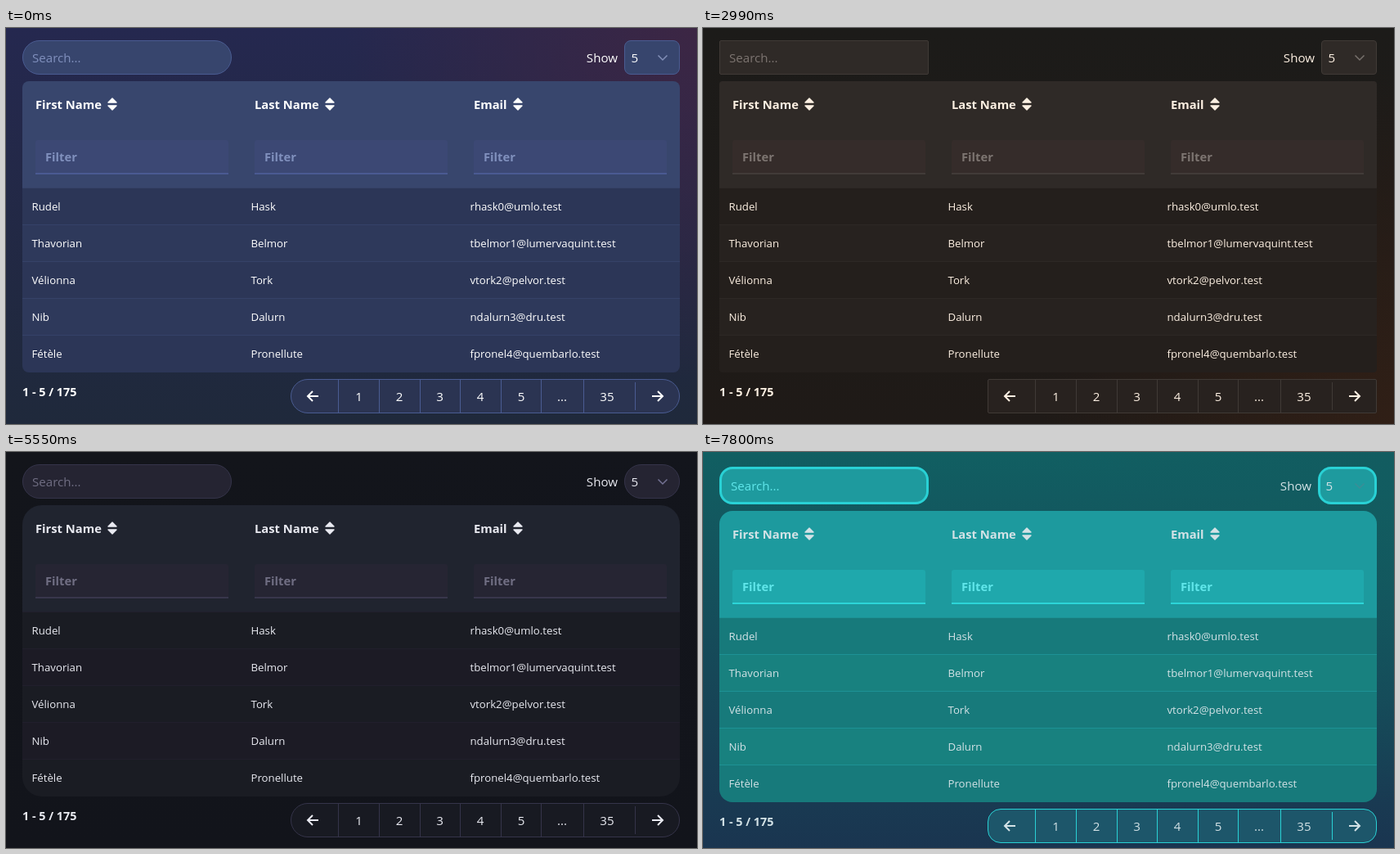
Animation, 845 px wide and 484 px high, one loop 8 s. Source, as an HTML page:

```html
<!DOCTYPE html>
<html lang="en">
<head>
<meta charset="utf-8">
<title>Table themes</title>
<style>
  html, body { margin: 0; width: 100%; height: 100%; overflow: hidden; background: #20263c; }
  svg { display: block; width: 845px; height: 484px; }
  text { white-space: pre; }
</style>
</head>
<body>
<svg id="stage" viewBox="0 0 845 484"></svg>
<script>
const LOOP = 8000, STEP = 70;
const stage = document.getElementById('stage');

const people = [
  ['Rudel', 'Hask', 'rhask0@umlo.test'],
  ['Thavorian', 'Belmor', 'tbelmor1@lumervaquint.test'],
  ['Vélionna', 'Tork', 'vtork2@pelvor.test'],
  ['Nib', 'Dalurn', 'ndalurn3@dru.test'],
  ['Fétèle', 'Pronellute', 'fpronel4@quembarlo.test'],
];
const columns = [['First Name', 88], ['Last Name', 86], ['Email', 48]];
const pages = [['1', 83.5], ['2', 133], ['3', 182.5], ['4', 232], ['5', 282], ['...', 332], ['35', 387]];
const dividers = [58.5, 108.5, 158.5, 207.5, 257.5, 306.5, 358.5];

// ---- themes ----
const colorKeys = 'sky ground glow head field line fill under row alt rule pager text hint mark'.split(' ');
const base = {
  glowX: 845, glowY: 0, weave: 0, inset: 0, border: 1, top: 15,
  searchR: 21, tableR: 24, selectR: 21, pagerR: 21,
  font: 'Open Sans', scale: .945, pageWeight: 400,
};
function theme(colors, shape) {
  const list = colors.split(' ');
  return { ...base, ...Object.fromEntries(colorKeys.map((key, i) => [key, '#' + list[i]])), ...shape };
}

const navy = theme('25284f 1f293b 3c2644 38466d 37456d 4a5c92 3c4874 4a5a92 2c3657 2e395b 354268 2b3452 ffffff 8090bd 8290b8',
  { tableR: 8, selectR: 8 });
const violet = theme('393a70 393568 3b366d 5352ae 4643a0 6561d2 5957b4 6c69d8 454389 484690 52509f 403e80 d8eadc a3a3dc 8580c0',
  { inset: 54, border: 3, top: 17, tableR: 28, font: 'Lato', scale: 1.03, pageWeight: 700 });
const ember = theme('1c1b19 1f1a17 301f16 2f2a27 2f2a27 403a36 352c2a 413b38 241f1c 27221f 2d2825 28221f fdf0e2 7d7571 78716d',
  { glowY: 484, searchR: 2, tableR: 4, selectR: 4, pagerR: 2 });
const slate = theme('2b3447 2b3447 2b3447 4a5979 4a5979 6076a9 4f5f83 667bb0 3c4660 3f4a65 4a5878 374159 ffffff 8c9dca 7d719f',
  { weave: 1, border: 2, top: 16, searchR: 2, tableR: 2, selectR: 2, pagerR: 0 });
const night = theme('13151b 12141b 13151c 20242f 252432 35344a 262533 38364c 1a1c23 1c1b25 211f2c 181a22 e9eaf1 706e83 747294');
const rose = theme('6b2c2e 561f2c 692a2d a33b4b a33b4b dc5169 b04051 dd5169 802f3b 862f3c 9a394a 742a37 ffeedd dc8090 8f70ae');
const teal = theme('115f62 1a3550 125c60 1d9a9e 1e9a9e 29d1d5 1fa8ac 2cd5d8 177a7b 18817f 1d9295 1d566a d3e2e6 60e6ea 3c8d96',
  { border: 3, top: 18, searchR: 16, tableR: 16, selectR: 16, pagerR: 16 });

const lerp = (a, b, p) => a + (b - a) * p;
function mixColor(a, b, p) {
  const part = (hex, i) => parseInt(hex.slice(1 + 2 * i, 3 + 2 * i), 16);
  return '#' + [0, 1, 2].map(i =>
    Math.round(lerp(part(a, i), part(b, i), p)).toString(16).padStart(2, '0')).join('');
}
function mix(a, b, p) {
  const out = {};
  for (const key in a) {
    if (typeof a[key] === 'number') out[key] = lerp(a[key], b[key], p);
    else if (a[key][0] === '#') out[key] = mixColor(a[key], b[key], p);
    else out[key] = p < .5 ? a[key] : b[key];
  }
  return out;
}

const round = { searchR: 21, tableR: 16, selectR: 16, pagerR: 21 };
const square = { searchR: 0, tableR: 0, selectR: 0, pagerR: 0 };
const indigo = { ...mix(navy, violet, .2), ...square, inset: 0, border: 0, top: 15, glow: '#2a2a50' };
const violetWide = { ...violet, inset: 0, border: 1, top: 15, font: 'Open Sans', scale: .945, pageWeight: 400 };

// Each change: start time, number of steps, theme reached, optional dissolve.
const changes = [
  [270, 6, { ...navy, ...square }],
  [820, 3, indigo],
  [1360, 6, violet, p => 1 - (1 - p) ** 6],
  [2040, 6, violetWide, p => p],
  [2780, 4, ember],
  [3450, 5, { ...mix(ember, slate, .5), ...square, weave: 0, border: 1, top: 15 }],
  [3930, 4, slate],
  [4420, 4, { ...mix(slate, night, .75), ...round, sky: night.sky, ground: night.ground, glow: night.glow, weave: 0 }],
  [4820, 4, night],
  [5550, 4, { ...night, ...round, ground: '#15161f' }],
  [5960, 4, { ...mix(night, rose, .45), ...round }],
  [6440, 4, rose],
  [6850, 5, { ...mix(rose, teal, .5), border: 1, top: 15 }],
  [7590, 4, teal],
];

// ---- drawing ----
const rect = (x, y, w, h, fill, extra = '') =>
  `<rect x="${x}" y="${y}" width="${w}" height="${h}" fill="${fill}" ${extra}/>`;
const path = (d, color, width) =>
  `<path d="${d}" fill="none" stroke="${color}" stroke-width="${width}"/>`;
const box = (x, y, w, h, r, border, fill, line) =>
  rect(x + border / 2, y + border / 2, w - border, h - border, fill,
    `rx="${Math.max(0, r - border / 2)}" stroke="${line}" stroke-width="${border}"`);

function view(t, id, opacity) {
  const left = 20 + t.inset, right = 824 - t.inset, width = right - left, col = width / 3;
  const label = (x, y, str, size, fill = t.text, weight = 400, anchor = 'start') =>
    `<text x="${x}" y="${y}" font-size="${size * t.scale}" font-weight="${weight}" fill="${fill}" text-anchor="${anchor}">${str}</text>`;
  const fieldH = 40 + 2 * t.border, tableY = t.top + fieldH + 8, pagerY = tableY + 364;
  const rowsY = tableY + 131;
  const selectW = 66 + 2 * t.border, selectX = right - selectW;
  const mid = t.top + fieldH / 2, pagerX = right - 476, arrowY = pagerY + 21;

  let out = `<g opacity="${opacity}" font-family="'${t.font}', 'Noto Sans', sans-serif"><defs>
    <linearGradient id="sky${id}" x2="0" y2="1"><stop stop-color="${t.sky}"/><stop offset="1" stop-color="${t.ground}"/></linearGradient>
    <radialGradient id="glow${id}" gradientUnits="userSpaceOnUse" cx="${t.glowX}" cy="${t.glowY}" r="430">
      <stop stop-color="${t.glow}"/><stop offset="1" stop-color="${t.glow}" stop-opacity="0"/></radialGradient>
    <pattern id="weave${id}" width="6" height="6" patternUnits="userSpaceOnUse">
      <path d="M-1 1L1 -1M0 6L6 0M5 7L7 5" stroke="#1c2434" stroke-opacity=".3"/></pattern>
    <clipPath id="clip${id}">${rect(left, tableY, width, 356, '#000', `rx="${t.tableR}"`)}</clipPath></defs>`;
  for (const layer of ['sky', 'glow']) out += rect(0, 0, 845, 484, `url(#${layer}${id})`);
  out += rect(0, 0, 845, 484, `url(#weave${id})`, `opacity="${t.weave}"`);

  out += box(left, t.top, 256, fieldH, t.searchR, t.border, t.field, t.line);
  out += label(left + 11 + t.border, mid + 6, 'Search...', 16, t.hint);
  out += label(selectX - 8, mid + 6, 'Show', 16, t.text, 400, 'end');
  out += box(selectX, t.top, selectW, fieldH, t.selectR, t.border, t.field, t.line);
  out += label(selectX + 8 + t.border / 2, mid + 6, '5', 16);
  out += path(`M${right - 26.5} ${mid - 2.5}l5.5 5.5l5.5 -5.5`, t.mark, 1.5);

  out += `<g clip-path="url(#clip${id})">` + rect(left, tableY, width, 131, t.head);
  people.forEach((_, i) => {
    const y = rowsY + 45 * i;
    out += rect(left, y, width, 45, i % 2 ? t.alt : t.row) + rect(left, y - 1, width, 1, t.rule);
  });
  out += '</g>';

  columns.forEach(([title, iconX], c) => {
    const x = left + 16 + c * col, icon = x + iconX, y = tableY + 28;
    out += label(x, y + 6, title, 15.6, t.text, 700);
    out += `<path d="M${icon + 1} ${y - 2}h10l-5 -5zM${icon + 1} ${y + 2}h10l-5 5z" fill="${t.text}" stroke="${t.text}" stroke-width="1.4" stroke-linejoin="round"/>`;
    out += rect(x, tableY + 72, col - 32, 42, t.fill, 'rx="3"');
    out += rect(x, tableY + 112, col - 32, 2, t.under);
    out += label(x + 12, tableY + 98, 'Filter', 15.6, t.hint, 700);
    people.forEach((person, r) => {
      out += label(x - 4.5, rowsY + 27 + 45 * r, person[c], 14);
    });
  });

  out += label(left, pagerY + 21, '1 - 5 / 175', 15.2, t.text, 700);
  out += box(pagerX, pagerY, 476, 42, t.pagerR, 1, t.pager, t.line);
  for (const x of dividers) out += path(`M${pagerX + x} ${pagerY}v42`, t.line, 1);
  out += path(`M${pagerX + 421.5} ${pagerY + 4}v34`, t.line, 1);
  for (const [str, x] of pages) out += label(pagerX + x, pagerY + 27, str, 16, t.text, t.pageWeight, 'middle');
  out += path(`M${pagerX + 34} ${arrowY}h-13m6 -6l-6 6l6 6`, t.text, 2);
  out += path(`M${pagerX + 442} ${arrowY}h13m-6 -6l6 6l-6 6`, t.text, 2);
  return out + '</g>';
}

// ---- timeline ----
const smooth = p => p * p * (3 - 2 * p);
let shown = '';

function render(time) {
  const index = changes.findLastIndex(([start]) => time >= start);
  const [start, steps, to, dissolve] = changes[index] || [0, 1, navy];
  const step = Math.min(steps, Math.floor((time - start) / STEP + .05) + 1);
  const key = index + ':' + step;
  if (key === shown) return;
  shown = key;

  const from = index > 0 ? changes[index - 1][2] : navy;
  if (step === steps) stage.innerHTML = view(to, 'A', 1);
  else if (dissolve) stage.innerHTML = view(from, 'A', 1) + view(to, 'B', dissolve(step / steps));
  else stage.innerHTML = view(mix(from, to, smooth((step - .8) / (steps - .8))), 'A', 1);
}

const begin = performance.now();
function tick() {
  render((performance.now() - begin) % LOOP);
  requestAnimationFrame(tick);
}
tick();
</script>
</body>
</html>
```
